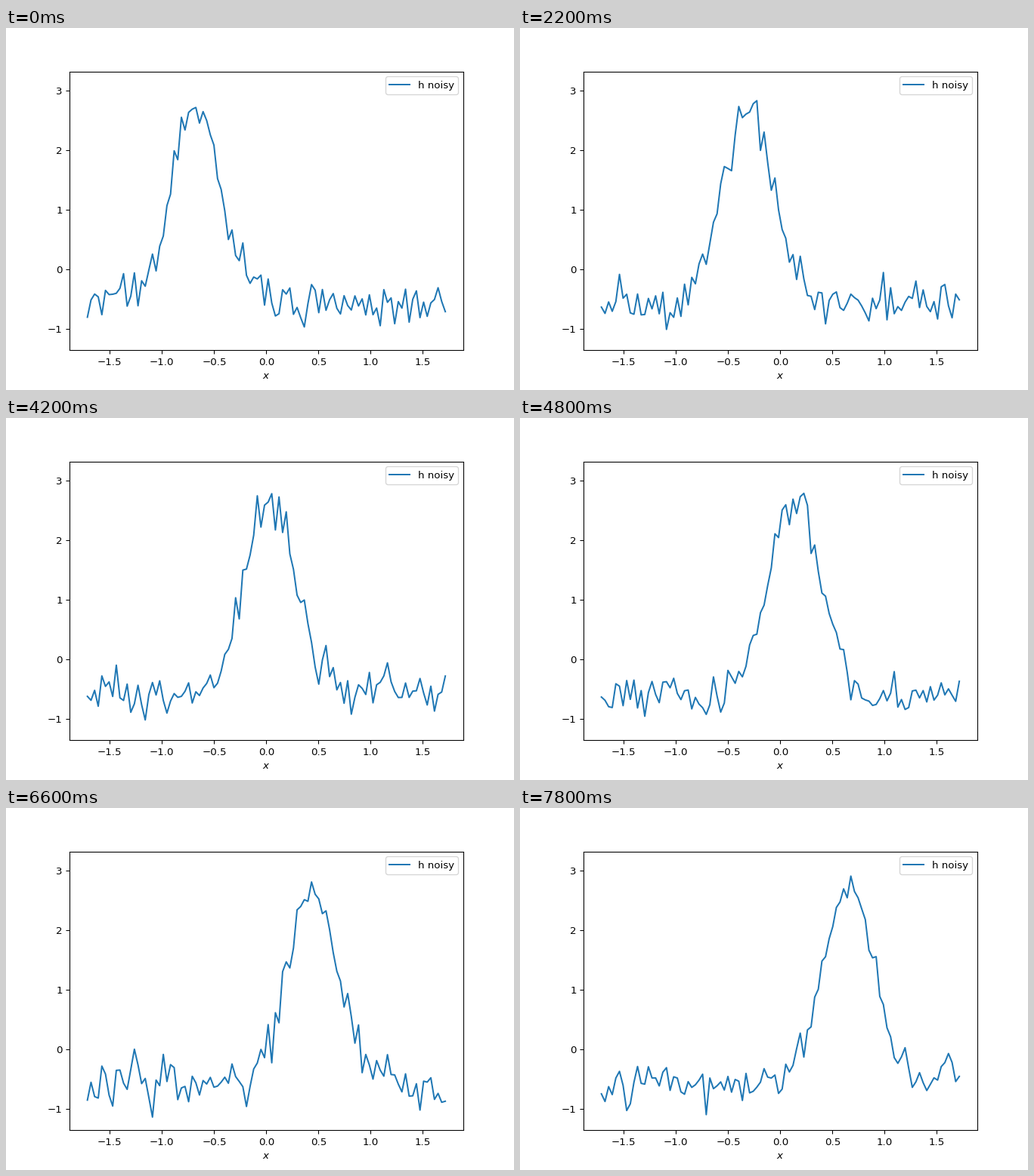
Write a matplotlib script that moves like this. It is 672 px wide and 480 px high and loops after 8 s.

```python
import numpy as np
import matplotlib.pyplot as plt
from matplotlib.animation import FuncAnimation

POINTS = 100
FRAMES = 40
INTERVAL = 200      # ms
WIDTH = 0.24        # standard deviation of the bump
NOISE = 0.2         # standard deviation of the noise
START = 30          # first centre of the bump, in grid steps
SPEED = 0.98        # grid steps per frame


def standardize(v):
    return (v - v.mean()) / v.std()


x = standardize(np.arange(POINTS, dtype=float))
step = x[1] - x[0]


def signal(frame):
    """Travelling Gaussian bump with fresh noise in every frame."""
    rng = np.random.default_rng(100 + frame)
    centre = x[0] + step * (START + SPEED * frame)
    bump = np.exp(-0.5 * ((x - centre) / WIDTH) ** 2)
    return standardize(bump) + rng.normal(0, NOISE, POINTS)


fig, ax = plt.subplots(figsize=(7, 5), dpi=96)
line, = ax.plot(x, signal(0), label="h noisy")
ax.set_ylim(-1.355, 3.322)
ax.set_xlabel("$x$")
ax.legend(loc="upper right")


def update(frame):
    line.set_ydata(signal(frame))
    return line,


anim = FuncAnimation(fig, update, frames=FRAMES, interval=INTERVAL,
                     repeat=True, repeat_delay=0)
plt.show()
```
